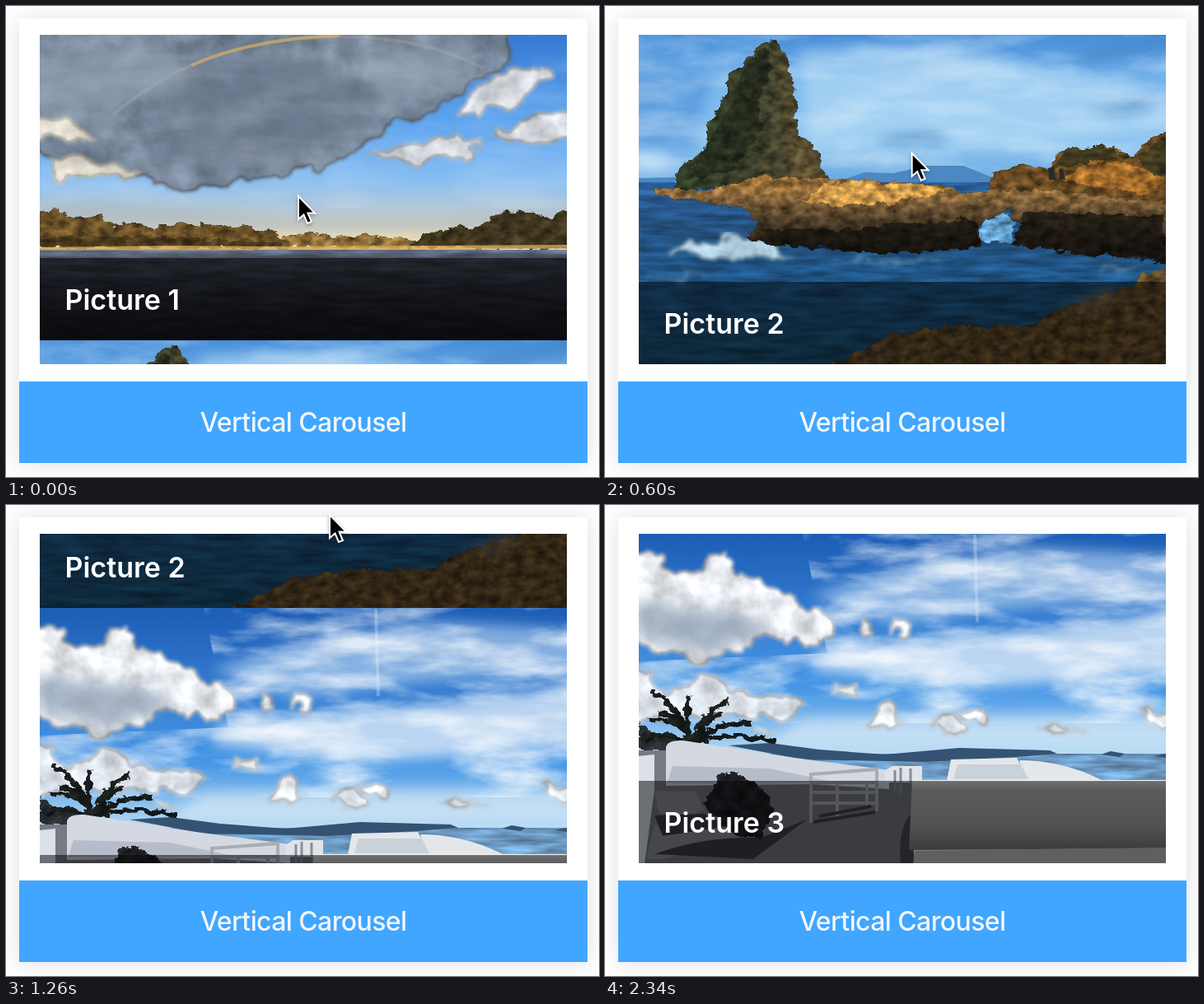
Write an HTML page that moves like this. It is 720x572 px and loops after 2.4 s.

```html
<!DOCTYPE html>
<html lang="en">
<head>
<meta charset="utf-8">
<title>Vertical Carousel</title>
<style>
  html, body { margin: 0; width: 100%; height: 100%; overflow: hidden; background: #fff; }
  #stage { position: relative; width: 720px; height: 572px; overflow: hidden; font-family: Inter, Roboto, sans-serif; }
  #card { position: absolute; left: 16px; top: 15px; width: 690px; height: 540px; background: #fff; box-shadow: 0 1px 26px rgba(0,0,0,.13); }
  #view { position: absolute; left: 41px; top: 35px; width: 640px; height: 400px; overflow: hidden; }
  #strip { will-change: transform; }
  #strip svg { display: block; }
  #footer { position: absolute; left: 16px; top: 456px; width: 690px; height: 99px; background: #40a6ff; color: #f3f6f9;
    font-size: 32px; font-weight: 500; line-height: 100px; letter-spacing: -.6px; text-align: center; }
  #cursor { position: absolute; left: 0; top: 0; overflow: visible; filter: drop-shadow(0 2px 2px rgba(0,0,0,.3)); }
  .caption { fill: #fff; font-size: 34px; font-weight: 600; }
  filter { color-interpolation-filters: sRGB; }
</style>
</head>
<body>
<svg width="0" height="0" style="position:absolute">
  <filter id="cloud" x="-20%" y="-30%" width="140%" height="160%">
    <feTurbulence type="fractalNoise" baseFrequency=".035" numOctaves="5" seed="4" result="noise"/>
    <feDisplacementMap in="SourceGraphic" in2="noise" scale="30" xChannelSelector="R" yChannelSelector="G"/>
    <feGaussianBlur stdDeviation="2" result="shape"/>
    <feColorMatrix in="noise" values="0 0 1 0 0  0 0 1 0 0  0 0 1 0 0  0 0 0 0 1" result="shade"/>
    <feComposite in="shape" in2="shade" operator="arithmetic" k1=".5" k2=".75"/>
  </filter>
  <filter id="soft" x="-20%" y="-100%" width="140%" height="300%"><feGaussianBlur stdDeviation="8"/></filter>
  <filter id="wisps" x="0" y="0" width="100%" height="100%">
    <feTurbulence type="fractalNoise" baseFrequency=".009 .03" numOctaves="5" seed="8"/>
    <feColorMatrix values="0 0 0 0 1  0 0 0 0 1  0 0 0 0 1  2.6 0 0 0 -1"/>
    <feComposite in="SourceGraphic" operator="in"/>
  </filter>
  <filter id="rock">
    <feTurbulence type="fractalNoise" baseFrequency=".07 .1" numOctaves="4" seed="2" result="noise"/>
    <feDisplacementMap in="SourceGraphic" in2="noise" scale="12" xChannelSelector="R" yChannelSelector="G" result="shape"/>
    <feColorMatrix in="noise" values="1 0 0 0 0  1 0 0 0 0  1 0 0 0 0  0 0 0 0 1" result="shade"/>
    <feComposite in="shape" in2="shade" operator="arithmetic" k1="1.3" k2=".35"/>
  </filter>
  <filter id="water" x="0" y="0" width="100%" height="100%">
    <feTurbulence type="fractalNoise" baseFrequency=".02 .13" numOctaves="3" seed="6"/>
    <feColorMatrix values="1 0 0 0 0  1 0 0 0 0  1 0 0 0 0  0 0 0 0 1" result="shade"/>
    <feComposite in="SourceGraphic" in2="shade" operator="arithmetic" k1=".8" k2=".6"/>
  </filter>
</svg>

<div id="stage">
  <div id="card"></div>
  <div id="view"><div id="strip">

    <svg width="640" height="400">
      <linearGradient id="sky1" x2="0" y2="1">
        <stop offset=".1" stop-color="#3679d2"/><stop offset=".45" stop-color="#5ca3ee"/>
        <stop offset=".7" stop-color="#86bdf2"/><stop offset=".84" stop-color="#b8cad6"/><stop offset=".95" stop-color="#e8dcb9"/>
      </linearGradient>
      <linearGradient id="lake" x2="0" y2="1">
        <stop stop-color="#6b7890"/><stop offset=".1" stop-color="#424857"/><stop offset=".5" stop-color="#272a34"/><stop offset="1" stop-color="#15161b"/>
      </linearGradient>
      <g transform="translate(-41 -6)">
        <rect x="41" y="6" width="640" height="290" fill="url(#sky1)"/>
        <path filter="url(#soft)" fill="#a5aeb7" d="M20 244Q140 232 270 250T700 247V272H20Z" opacity=".5"/>
        <path filter="url(#cloud)" fill="#748497" d="M10-20H610L615 66 570 92 525 125 460 150 430 174 380 196 300 216 210 222 140 204 80 194 10 176Z"/>
        <path filter="url(#soft)" fill="#68768a" d="M150 70 360 60 470 110 400 165 290 200 180 185 220 130Z" opacity=".7"/>
        <path filter="url(#soft)" fill="#8b9caf" d="M40 60 180 45 220 80 130 130 40 130ZM430 60 570 45 550 90 460 130Z" opacity=".7"/>
        <path filter="url(#cloud)" fill="#ded9ca" d="M15 128 70 138 115 160 20 166ZM45 184 110 186 165 203 135 213 60 204Z"/>
        <path filter="url(#cloud)" fill="#d5d9df" d="M560 112 595 84 650 70 665 86 635 110 590 130 545 138ZM580 160 630 135 695 126V160L640 168ZM440 184 500 160 580 160 560 182 500 192Z"/>
        <rect x="41" y="6" width="640" height="240" fill="#fff" filter="url(#wisps)" opacity=".14"/>
        <path fill="none" stroke="#e1b263" stroke-width="4" opacity=".65" d="M225 72Q300 39 405 36"/>
        <path fill="none" stroke="#bdb4a4" stroke-width="4" opacity=".25" d="M130 132Q180 90 230 70M405 37Q510 38 580 76"/>
        <path filter="url(#rock)" fill="#90703a" d="M330 293V282L370 275 400 281 440 278 500 285 560 287V293Z"/>
        <path filter="url(#rock)" fill="#695028" d="M25 252 60 247 85 258 115 254 130 268 155 263 180 270 205 263 250 266 285 267 320 274 344 287V294H25Z"/>
        <path filter="url(#rock)" fill="#3f351f" d="M490 289 515 276 550 268 575 268 600 252 635 249 660 258 695 237V294H490Z"/>
        <path fill="#3d3018" opacity=".65" filter="url(#rock)" d="M30 280 180 280 335 287V293H30Z"/>
        <path fill="#d5a958" d="M41 293 200 291 345 292 500 291 681 290V293L560 296 41 298Z" opacity=".8"/>
        <rect x="41" y="296" width="640" height="111" fill="url(#lake)" filter="url(#water)"/>
        <path stroke="#b0a27d" stroke-width="2" d="M41 296H300M580 294H681" opacity=".65"/>
      </g>
      <rect y="300" width="640" height="100" opacity=".5"/>
      <text class="caption" x="30.5" y="363">Picture 1</text>
    </svg>

    <svg width="640" height="400">
      <linearGradient id="sky2" x2="0" y2="1">
        <stop stop-color="#468dd8"/><stop offset=".35" stop-color="#7db9ed"/><stop offset=".75" stop-color="#8cc3ef"/><stop offset="1" stop-color="#65a5df"/>
      </linearGradient>
      <linearGradient id="sea2" x2="0" y2="1">
        <stop stop-color="#2c62a0"/><stop offset=".25" stop-color="#244f7c"/><stop offset=".55" stop-color="#1f5688"/><stop offset="1" stop-color="#1b5274"/>
      </linearGradient>
      <linearGradient id="ledge" x2="0" y2="1">
        <stop stop-color="#a87a3c"/><stop offset=".25" stop-color="#80613a"/><stop offset=".5" stop-color="#453725"/><stop offset=".85" stop-color="#16130e"/>
      </linearGradient>
      <linearGradient id="tower">
        <stop stop-color="#323f29"/><stop offset=".55" stop-color="#3a3c29"/><stop offset=".8" stop-color="#5c5032"/><stop offset="1" stop-color="#3b3a20"/>
      </linearGradient>
      <g transform="translate(-41 -35)">
        <rect x="41" y="35" width="640" height="182" fill="url(#sky2)"/>
        <path filter="url(#soft)" fill="#b4dbf5" d="M235 55 420 45 560 90 690 115V150L500 170 250 160Z" opacity=".65"/>
        <path filter="url(#soft)" fill="#4a8dd6" d="M20 70 130 80 110 175 20 175Z" opacity=".6"/>
        <path filter="url(#soft)" fill="#3f7fbe" d="M575 128 640 113 685 112 640 130ZM325 160 400 154 425 163 360 170ZM560 60 690 38V47L590 67Z" opacity=".75"/>
        <rect x="41" y="35" width="640" height="180" fill="#e4f3fd" filter="url(#wisps)" opacity=".4"/>
        <path filter="url(#soft)" fill="#e0f0fc" d="M30 180 65 181 88 188 60 195 30 193Z"/>
        <path fill="#4c88c2" d="M41 209 85 208V217H41ZM280 214 315 202 350 203 390 194 435 194 475 210V217H280Z"/>
        <rect x="41" y="214" width="640" height="222" fill="url(#sea2)" filter="url(#water)"/>
        <path filter="url(#cloud)" fill="#b9d9ec" d="M75 297 130 285 185 282 232 302 190 306 110 305Z"/>
        <path filter="url(#cloud)" fill="#6da2c8" d="M40 328 95 323 140 328 80 333ZM230 306 350 309 440 303 360 315ZM590 320 660 317 630 328Z" opacity=".5"/>
        <path fill="#5f9ac5" d="M452 285 458 262 480 246 498 264 493 288Z" filter="url(#rock)"/>
        <path filter="url(#rock)" fill="url(#tower)" d="M83 222 91 195 122 176 126 142 147 106 151 80 181 61 189 43 205 41 220 60 229 100 234 155 258 175 267 204 285 216Z"/>
        <path filter="url(#rock)" fill="#1c2318" opacity=".6" d="M100 210 126 165 155 118 170 75 195 50 203 75 187 115 190 150 155 200Z"/>
        <path filter="url(#rock)" fill="#684a24" d="M467 225 471 201 500 194 540 197 552 178 605 168 642 184 660 162 695 144V250L500 243Z"/>
        <path filter="url(#rock)" fill="#33331f" d="M540 200 560 176 600 169 635 185 590 190ZM645 185 690 149V205L670 208Z" opacity=".75"/>
        <path filter="url(#rock)" fill="#a06b2b" d="M550 212 590 189 640 190 680 210 660 230Z"/>
        <path filter="url(#rock)" fill="url(#ledge)" d="M60 222 130 222 185 207 270 210 310 212 400 216 435 226 500 222 600 230 700 240V318L650 304 560 300 492 291 504 270 487 248 469 257 451 266 457 292 400 297 330 301 260 292 203 292 172 280 187 264 165 243 110 237 65 229Z"/>
        <path filter="url(#rock)" fill="#cf9a4c" d="M240 238 265 218 305 209 345 216 395 216 415 226 345 240 290 242Z"/>
        <path filter="url(#rock)" fill="#15120e" opacity=".7" d="M190 271 290 272 380 262 449 260 452 292 330 300 205 290ZM510 250 680 255V312L570 294 495 289Z"/>
        <path fill="#292b29" d="M538 197 545 195 547 211H539ZM551 198 556 197 559 211H552Z"/>
        <path filter="url(#rock)" fill="#644d2b" d="M265 442 315 416 345 400 420 388 460 390 520 387 550 366 640 342 655 324 695 318V445Z"/>
        <path filter="url(#soft)" fill="#8d877e" d="M555 364 595 348 635 346 605 365Z" opacity=".6"/>
      </g>
      <rect y="300" width="640" height="100" opacity=".5"/>
      <text class="caption" x="30.5" y="363">Picture 2</text>
    </svg>

    <svg width="640" height="400">
      <linearGradient id="sky3" x2="0" y2="1">
        <stop stop-color="#1c5cb4"/><stop offset=".35" stop-color="#337bd0"/><stop offset=".7" stop-color="#4797e6"/><stop offset="1" stop-color="#b9dcf3"/>
      </linearGradient>
      <linearGradient id="wall" x2="0" y2="1">
        <stop stop-color="#dedfe1"/><stop offset=".15" stop-color="#b6b7ba"/><stop offset=".65" stop-color="#a5a6a9"/><stop offset="1" stop-color="#76777a"/>
      </linearGradient>
      <g transform="translate(-41 -35)">
        <rect x="41" y="35" width="640" height="270" fill="url(#sky3)"/>
        <path filter="url(#soft)" fill="#e5eff9" d="M260 175 370 166 520 153 700 130V199L560 214 440 222 250 200Z" opacity=".75"/>
        <path filter="url(#soft)" fill="#c0daf3" d="M250 110 360 75 500 50 700 62V110L500 125 350 145Z" opacity=".6"/>
        <path filter="url(#wisps)" fill="#fff" d="M240 35H681V265H41V190L270 180Z" opacity=".75"/>
        <path filter="url(#soft)" fill="#dcecf8" d="M240 259 690 254V295H190Z" opacity=".65"/>
        <path stroke="#fff" stroke-width="4" d="M449 36 452 142" opacity=".25"/>
        <path filter="url(#cloud)" fill="#e9ecf1" d="M20 50 55 55 85 82 120 83 118 55 150 61 155 80 195 96 232 110 255 127 276 157 256 172 210 164 165 174 125 194 80 182 20 165Z"/>
        <path filter="url(#soft)" fill="#8e9fb4" d="M35 115 100 125 160 130 205 150 130 180 40 160Z" opacity=".75"/>
        <path filter="url(#cloud)" fill="#e4eaf1" d="M20 203 58 202 80 224 120 208 155 225 215 232 248 246 225 258 20 260Z"/>
        <path filter="url(#cloud)" fill="#eef4f8" d="M310 139 326 139 327 155 310 156ZM348 141 372 144 370 157 348 157ZM274 221 302 225 300 238ZM320 272 330 245 345 243 365 270ZM390 277 405 255 422 253 440 274ZM427 247 470 253 462 267 440 266ZM640 250 690 250V274ZM525 267 590 270 550 278ZM175 268 213 274 180 279Z"/>
        <path fill="#6d9bc4" d="M180 302H681V340H180Z" filter="url(#water)"/>
        <path fill="#345372" d="M150 292 200 289 260 297 340 303 430 295 540 298 549 302 500 306 390 312 240 309ZM602 303 614 299 631 302 625 306ZM666 305 681 302V307Z"/>
        <path fill="#292f31" d="M41 266 65 280 110 280 100 298H41Z" filter="url(#rock)"/>
        <path fill="none" stroke="#181d1c" stroke-width="6" filter="url(#rock)" d="M106 289Q92 256 53 262M106 289Q78 232 58 227M106 289Q93 250 104 234M106 289Q125 245 151 237M106 289Q130 265 177 265M106 289Q145 275 208 286M105 289Q65 273 48 285M106 287Q83 250 67 253M106 288Q133 250 140 255"/>
        <path fill="#777983" d="M41 298H75L345 325 374 340V436H41Z"/>
        <path fill="#d4d9e1" d="M74 341V294Q76 285 95 286L230 307 345 322V345L250 339Z"/>
        <path fill="#a3abb9" d="M82 317 200 320 280 337 170 339 75 338Z" opacity=".6"/>
        <path fill="#dce1e7" d="M41 305 60 303V346L48 436H41Z"/>
        <path fill="#8c9099" d="M60 347 110 348 120 370 95 380 65 374ZM60 389 150 384 190 405 130 410 75 430 50 430Z"/>
        <path fill="#3d3f46" d="M60 377 120 375 150 390 70 402ZM60 424Q120 402 190 404L245 382 180 430Z"/>
        <path filter="url(#rock)" fill="#202126" d="M119 365 142 324 160 327 193 344 206 371 190 404 160 402Z"/>
        <g fill="none" stroke="#a9acb1" stroke-width="4">
          <path d="M250 327 330 321V372M250 325V386M282 337V379M250 337H330M250 349H330M250 362H330M318 337V369"/>
          <path stroke="#42434a" d="M253 385 328 373M260 378 323 366"/>
        </g>
        <path fill="#e0e4e9" d="M339 323 349 317H385V337H340Z"/>
        <path stroke="#858e9a" stroke-width="3" d="M352 322V350M359 319V351M371 320V338"/>
        <path fill="#e4e7ea" d="M420 309 500 307 515 335H415ZM503 310Q555 310 603 334H510Z"/>
        <path fill="#b4c0cd" d="M428 315H505L514 333H423Z" opacity=".55"/>
        <path fill="#494a50" d="M371 375Q355 395 359 436H376Z"/>
        <path fill="url(#wall)" d="M373 335H681V417L369 419Z"/>
        <path fill="#bfc0c3" d="M376 420 681 416V436H374Z"/>
        <path stroke="#f4f4f4" stroke-width="2" d="M373 335H681"/>
      </g>
      <rect y="300" width="640" height="100" opacity=".5"/>
      <text class="caption" x="30.5" y="363">Picture 3</text>
    </svg>

  </div></div>
  <div id="footer">Vertical Carousel</div>
  <svg id="cursor" width="24" height="36">
    <path d="M0 0V28L6.5 22.5 11 33 16 31 11.5 20.5H20Z" stroke="#fff" stroke-width="2"/>
  </svg>
</div>

<script>
  const LOOP = 2400, STEP = 60;
  const strip = document.getElementById('strip');
  const cursor = document.getElementById('cursor');

  // Keys are [time, value, easeOutPower]: each drag is linear, each release eases out.
  const scroll = [[0, 29], [180, 199], [540, 400, 2.3], [930, 400], [1140, 590], [1530, 800, 2.3]];
  const cursorX = [[0, 355], [180, 372], [480, 372], [840, 374], [1140, 393]];
  const cursorY = [[0, 231], [180, 61], [480, 61], [780, 281, 1.5], [840, 281], [1140, 8], [1200, 12], [1640, 12], [2100, 590]];

  function valueAt(keys, t) {
    const i = keys.findIndex(key => key[0] > t);
    if (i < 0) return keys[keys.length - 1][1];
    const [t0, from] = keys[i - 1], [t1, to, power = 1] = keys[i];
    return from + (to - from) * (1 - (1 - (t - t0) / (t1 - t0)) ** power);
  }

  const start = performance.now();
  function draw() {
    const elapsed = Math.max(0, performance.now() - start) % LOOP;
    const t = Math.floor(elapsed / STEP) * STEP;
    strip.style.transform = `translateY(${-Math.round(valueAt(scroll, t))}px)`;
    cursor.style.transform = `translate(${valueAt(cursorX, t)}px, ${valueAt(cursorY, t)}px)`;
    requestAnimationFrame(draw);
  }
  draw();
</script>
</body>
</html>
```
